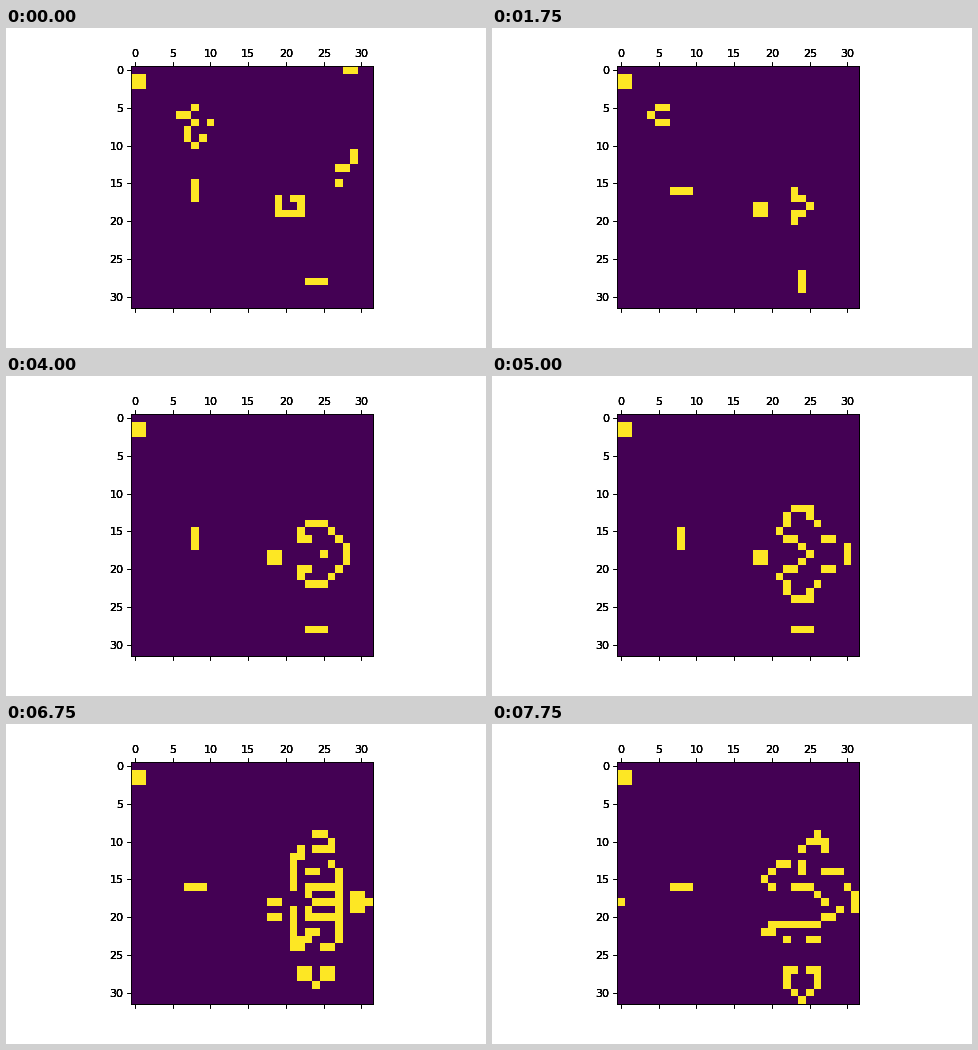
A matplotlib script for the animation above (8000 ms loop, 480 px wide and 320 px high).

```python
import numpy as np
import matplotlib.pyplot as plt
from matplotlib.animation import FuncAnimation

SIZE = 32
STEPS = 32
INTERVAL = 250
LAYERS = 4  # stacked axes darken the antialiased labels and ticks

# (row, column, pattern) with "#" for a live cell and "/" between rows
SEEDS = [
    (1, 0, "##/##"),
    (0, 28, "##"),
    (5, 6, "..#/##/..#.#/.#/.#.#/..#"),
    (15, 8, "#/#/#"),
    (11, 27, "..#/..#/##//#"),
    (17, 19, "#.##/#..#/####"),
    (28, 23, "###"),
]


def seed_grid():
    grid = np.zeros((SIZE, SIZE), dtype=int)
    for row, col, pattern in SEEDS:
        for dy, line in enumerate(pattern.split("/")):
            for dx, mark in enumerate(line):
                grid[row + dy, col + dx] = mark == "#"
    return grid


def evolve(grid):
    """One Game of Life step on a torus."""
    shifts = [(dy, dx) for dy in (-1, 0, 1) for dx in (-1, 0, 1) if dy or dx]
    near = sum(np.roll(grid, s, axis=(0, 1)) for s in shifts)
    return ((near == 3) | ((grid == 1) & (near == 2))).astype(int)


history = [seed_grid()]
while len(history) < STEPS:
    history.append(evolve(history[-1]))

plt.rcParams.update({"font.family": "DejaVu Sans", "font.size": 10})
fig = plt.figure(figsize=(6, 4), dpi=80, facecolor="white")
fig.subplots_adjust(left=0.125, right=0.9, bottom=0.125, top=0.88)
images = [
    fig.add_subplot().matshow(history[0], cmap="viridis", vmin=0, vmax=1)
    for _ in range(LAYERS)
]


def draw(step):
    for image in images:
        image.set_data(history[step])
    return images


anim = FuncAnimation(fig, draw, frames=STEPS, interval=INTERVAL, repeat=True)
plt.show()
```
